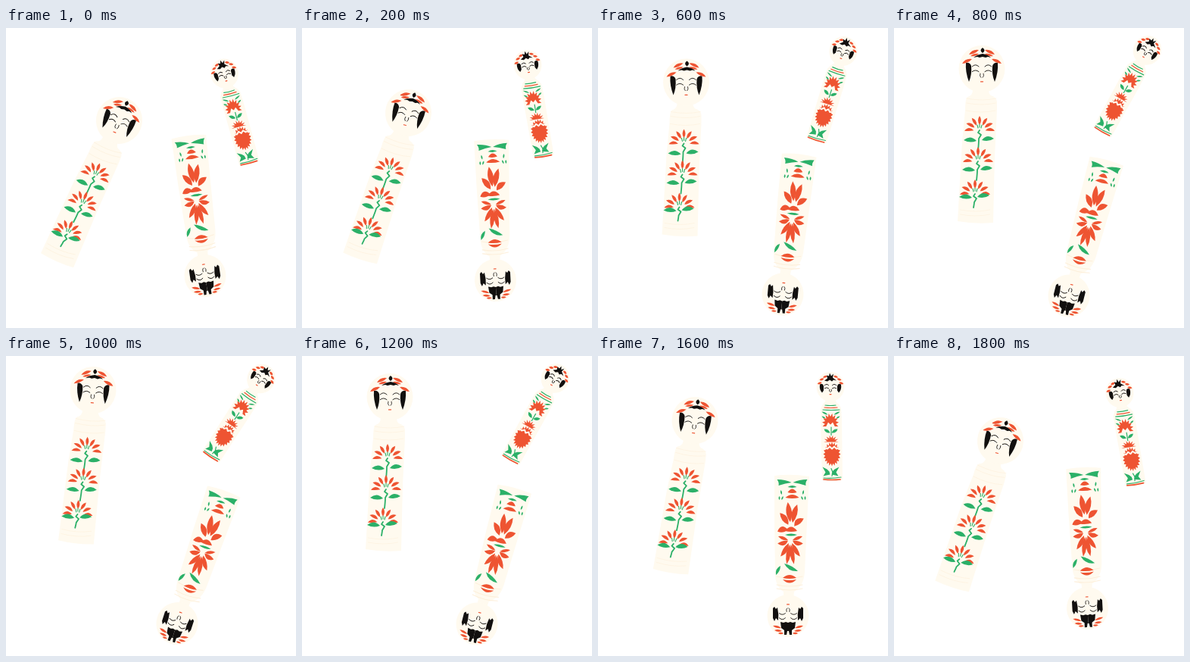
An HTML page with a canvas for the animation above (2 s loop, 383 by 396 pixels).

```html
<!DOCTYPE html>
<html lang="en">
<head>
<meta charset="utf-8">
<title>Kokeshi dolls</title>
<style>
html, body { margin: 0; width: 100%; height: 100%; overflow: hidden; background: #fff; }
canvas { display: block; width: 383px; height: 396px; }
</style>
</head>
<body>
<canvas id="stage" width="383" height="396"></canvas>
<script>
const ctx = document.getElementById('stage').getContext('2d');
const CREAM = '#fffaef', PEACH = '#fdf0dc', RED = '#ee5432', GREEN = '#2bb068', BLACK = '#12100f';
const rad = degrees => degrees * Math.PI / 180;

function fill(color, d) {
  ctx.fillStyle = color;
  ctx.fill(new Path2D(d));
}

function line(color, width, d) {
  ctx.strokeStyle = color;
  ctx.lineWidth = width;
  ctx.stroke(new Path2D(d));
}

function oval(color, x, y, rx, ry = rx) {
  ctx.fillStyle = color;
  ctx.beginPath();
  ctx.ellipse(x, y, rx, ry, 0, 0, Math.PI * 2);
  ctx.fill();
}

function at(x, y, draw) {
  ctx.save();
  ctx.translate(x, y);
  draw();
  ctx.restore();
}

// Draws a half and its mirror image about x = 0.
function both(draw) {
  draw();
  ctx.save();
  ctx.scale(-1, 1);
  draw();
  ctx.restore();
}

// A pointed petal between two tips; bend curves its spine sideways.
function petal(color, x1, y1, x2, y2, width, bend = 0) {
  const dx = x2 - x1, dy = y2 - y1, len = Math.hypot(dx, dy);
  const mx = (x1 + x2) / 2, my = (y1 + y2) / 2;
  const nx = -dy / len, ny = dx / len;
  const a = bend + width, b = bend - width;
  ctx.fillStyle = color;
  ctx.beginPath();
  ctx.moveTo(x1, y1);
  ctx.quadraticCurveTo(mx + nx * a, my + ny * a, x2, y2);
  ctx.quadraticCurveTo(mx + nx * b, my + ny * b, x1, y1);
  ctx.fill();
}

// Petals spread over an elliptic arc around (0, 0), bending away from its middle.
function fan(count, from, to, rx, ry, inner, width) {
  for (let i = 0; i < count; i++) {
    const t = i / (count - 1), a = rad(from + (to - from) * t);
    const x = Math.cos(a) * rx, y = Math.sin(a) * ry;
    petal(RED, x * inner, y * inner, x, y, width, (1 - 2 * t) * 3);
  }
}

// A spiky blossom around (0, 0).
function burst(spikes, rx, ry, inner, from = 0, to = 360) {
  ctx.fillStyle = RED;
  ctx.beginPath();
  for (let i = 0; i <= spikes * 2; i++) {
    const a = rad(from + (to - from) * i / (spikes * 2)), r = i % 2 ? inner : 1;
    ctx.lineTo(Math.cos(a) * rx * r, Math.sin(a) * ry * r);
  }
  ctx.fill();
}

// Eyes, brows and nose, in units of the head's radius.
function face(r) {
  const arc = (x, y, w, h) => line(BLACK, .9, `M${x * r} ${y * r}q${w * r / 2} ${-h * r} ${w * r} 0`);
  both(() => {
    arc(.13, -.1, .29, .15);
    arc(.13, .12, .29, .12);
    line(BLACK, .8, `M${.07 * r} ${.2 * r}q${.04 * r} ${.12 * r} ${-.03 * r} ${.17 * r}`);
  });
  line(RED, 1.2, `M${-.05 * r} ${.55 * r}h${.1 * r}`);
}

function blossom(x, y, drop) {
  at(x, y, () => {
    fan(7, -182, 2, 20, 19, .38, 4);
    for (let i = -1; i <= 1; i++) line(GREEN, 1.1, `M${i * 3} ${Math.abs(i) - 8}l${-i} 4`);
    petal(GREEN, -21, drop + 1, -4, drop + 2, 6, -2);
    petal(GREEN, 3, drop + 1, 19, drop - 1, 6, -2);
    line(GREEN, 1.8, `M0 0l-2 3l4 3l-3 5q0 ${drop / 2} -1 ${drop + 4}`);
  });
}

function flowerDoll() {
  fill(CREAM, 'M-12 28Q-12 35 -19 37Q-22 39 -22 54L-26 96L-32 201Q-9 205 15 203L17 116L20 54V43Q19 37 12 35Q9 33 9 28Z');
  oval(CREAM, 0, 0, 30.5, 31);
  for (const y of [39, 45, 55, 186, 192]) line(PEACH, .6, `M${-18 - y / 18} ${y}q21 4 39 0`);

  face(30.5);
  both(() => {
    fill(BLACK, 'M-21 -8Q-16 -9 -14 -4Q-13 8 -17 17Q-22 4 -21 -8Z');
    petal(RED, -26, -7, -13, -13, 4, -1);
    petal(RED, -17, -19, -4, -25, 4, -1);
    petal(RED, -15, -17, -4, -20, 3);
  });
  fill(BLACK, 'M-11 -15Q-6 -19 1 -20Q8 -19 12 -15L8 -16L5 -15L1 -16L-3 -15L-6 -16Z');
  petal(BLACK, 1, -28, 1, -21, 5);

  blossom(-3, 81, 12);
  blossom(-5, 122, 10);
  blossom(-9, 165, 3);
}

function smallDoll() {
  fill(CREAM, 'M-6 15Q-6 20 -10 23L-13 29V44L-11 123Q3 126 16 123L15 44L14 28L11 23Q6 20 6 15Z');
  oval(CREAM, 0, 0, 18.5, 19.5);

  face(18.5);
  both(() => {
    fill(BLACK, 'M-14 -3Q-10 -5 -9 -1V5L-11 8Q-15 4 -14 -3Z');
    for (let a = 198; a < 260; a += 22) {
      const x = Math.cos(rad(a)) * 15, y = Math.sin(rad(a)) * 15;
      petal(RED, x - 3, y + 1, x + 3, y - 1, 3);
    }
  });
  fill(BLACK, 'M-8 -8L-4 -11L-5 -15L-2 -14L-1 -18L1 -14L4 -17L3 -12L8 -8L4 -9L2 -7L-1 -9L-4 -7Z');

  line(GREEN, 1.2, 'M-7 24.5q7 1 14 0M-10 30.5q11 1 22 0');
  line(RED, 1.2, 'M-8 27.5q8 1 17 0');
  at(.5, 0, () => both(() => {
    petal(GREEN, -12, 33, -4, 37, 2);
    petal(GREEN, -12, 39, -7, 42, 2);
    petal(GREEN, -9, 56, -1, 61, 4);
    fill(GREEN, 'M-11 106L-5 109L-2 112L-1 116L-6 117L-10 118L-7 113Z');
  }));
  line(GREEN, 1.2, 'M1 53v11M1 108l2 5l-1 5M-9 120.5q11 1 23 -1');

  at(0, 48, () => {
    burst(9, 11, 13, .66, 160, 380);
    fill(CREAM, 'M-6 5L-3 -1L0 2L3 -1L6 5Z');
  });
  at(1, 73, () => burst(7, 10, 9, .55, 180, 360));
  at(2, 89, () => {
    burst(20, 11.5, 16, .78);
    line(CREAM, 2, 'M-11 -9L-6 -7L-3 -10L0 -7L3 -10L6 -7L11 -9');
  });
  line(RED, 1.7, 'M-9 122.5q11 1 22 0');
}

function invertedDoll() {
  fill(CREAM, 'M-18 -185Q5 -188 28 -184L25 -123L22 -58Q21 -40 8 -32L7 -21H-6V-32Q-17 -39 -17 -56L-18 -123Z');
  oval(CREAM, 0, 0, 27.5, 28);
  for (const y of [-52, -41, -36]) line(PEACH, 1.1, `M-15 ${y}q17 4 34 0`);

  at(5.5, -172, () => {
    both(() => {
      fill(GREEN, 'M-20 -8Q-9 -8 -1 -4Q-9 -3 -18 0Q-17 -4 -20 -8Z');
      petal(GREEN, -15, 6, -14, 12, 2);
      petal(GREEN, -17, 14, -17, 19, 2);
      petal(GREEN, -12, 14, -14, 19, 2);
    });
    fill(GREEN, 'M-6 2Q0 -2 6 2L0 3Z');
    fill(RED, 'M-6 9Q0 0 6 9Q0 11 -6 9ZM-9 16Q0 8 9 16Q0 18 -9 16Z');
  });
  at(4, -115, () => {
    fan(5, -186, -22, 18, 36, .25, 7.5);
    fill(RED, 'M-8 3Q0 -8 8 3Q0 5 -8 3Z');
    petal(GREEN, -8, 8, 8, 8, 3);
  });
  at(3, -100, () => {
    fan(6, 8, 172, 17, 33, .18, 6);
    both(() => petal(RED, 3, 0, 16, -5, 4));
  });
  petal(GREEN, -5, -69, 13, -59, 5, 2);
  petal(GREEN, -16, -54, -10, -66, 4, -1);
  fill(RED, 'M-7 -50q9 -8 18 0q-9 2 -18 0ZM-7 -48q9 2 18 0q-9 9 -18 0Z');

  ctx.rotate(Math.PI);
  face(27.5);
  both(() => {
    fill(BLACK, 'M13 -6L16 -3L18 -7L20 -3V10L18 12L16 9L14 11Q12 2 13 -6Z');
    petal(RED, 9, -16, 20, -13, 3);
    petal(RED, 8, -20, 18, -19, 3);
    petal(RED, 6, -23, 13, -23, 2.5);
    fill(BLACK, 'M0 -9L3 -8L6 -9L10 -8L9 -16L5 -19V-25H2L1 -20H0Z');
  });
}

// Each key holds the head's x and y and the tilt in degrees.
const dolls = [
  { draw: flowerDoll, keys: [[149.5, 122, 21.5], [140.5, 112, 16], [128, 85, 6.7], [116.5, 71.5, 0], [116, 54, 0], [115, 45, 4]] },
  { draw: smallDoll, keys: [[288.5, 60, -14.4], [298, 48.5, -8.8], [307, 40.5, 0], [324, 30.5, 18], [334.5, 29.5, 30], [337, 30, 34]] },
  { draw: invertedDoll, keys: [[263, 327, -8.3], [255.5, 333, -3.2], [251, 343, 0], [244, 351.5, 5.2], [231, 353.5, 14.1], [226, 353, 18]] }
];

// The dolls swing there and back in ten held steps.
function render(now) {
  const step = Math.floor(now % 2000 / 200);
  const pose = Math.min(step, 10 - step);
  ctx.fillStyle = '#fff';
  ctx.fillRect(0, 0, 383, 396);
  for (const { draw, keys } of dolls) {
    const [x, y, tilt] = keys[pose];
    at(x, y, () => {
      ctx.rotate(rad(tilt));
      draw();
    });
  }
}

const start = performance.now();
ctx.lineCap = ctx.lineJoin = 'round';
(function tick() {
  render(performance.now() - start);
  requestAnimationFrame(tick);
})();
</script>
</body>
</html>
```
